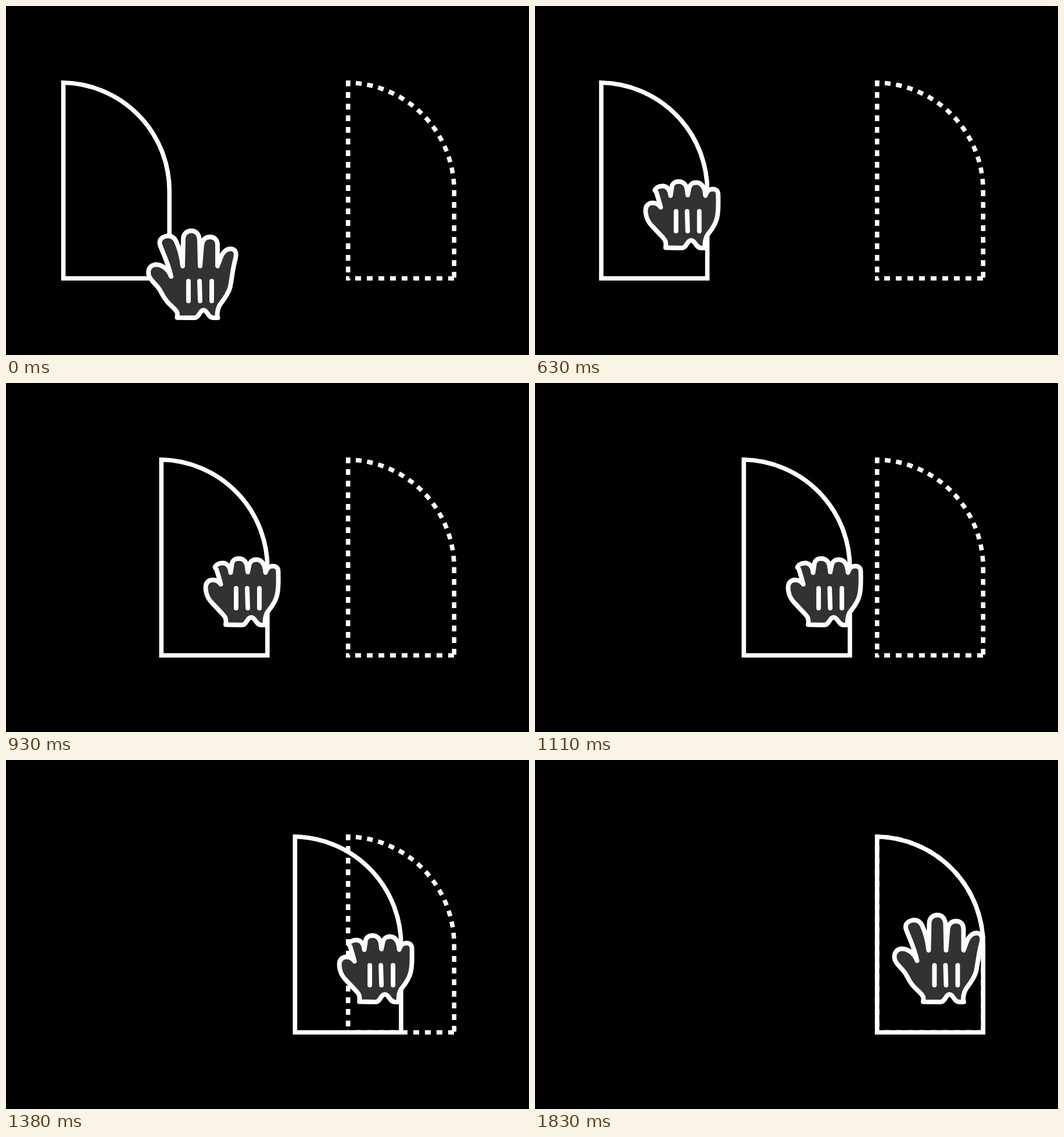
Write an HTML page that moves like this. It is 900 by 600 pixels and loops after 2580 ms.

```html
<!DOCTYPE html>
<html lang="en">
<head>
<meta charset="utf-8">
<title>Drag and drop</title>
<style>
  html, body { margin: 0; width: 100%; height: 100%; overflow: hidden; background: #000; }
  svg { display: block; width: 900px; height: 600px; }
  path { fill: none; stroke: #fff; stroke-width: 7.6; }
  #hand path { stroke-width: 7.9; stroke-linecap: round; stroke-linejoin: round; }
  #hand .glove { fill: #323232; }
  .dashed { stroke-dasharray: 10 10; }
  .dashed.arc { stroke-dasharray: 10 9.57; stroke-dashoffset: -13.3; }
</style>
</head>
<body>
<svg viewBox="0 0 900 600">
  <!-- drop zone: each edge carries its own dash rhythm -->
  <path class="dashed" d="M588.7 128V472"/>
  <path class="dashed" d="M770.9 468.2H585"/>
  <path class="dashed" d="M771.2 466.9V318"/>
  <path class="dashed arc" d="M588.7 131.8A186.2 186.2 0 0 1 771.2 318"/>

  <path id="shape" d="M98.7 131.8A186.2 186.2 0 0 1 281.2 318V468.2H98.7Z"/>

  <g id="hand">
    <path id="open" class="glove" d="M284 465C279 452 268 444 257 444.500C246 446 243 456 246.500 465
      C250 473 259 479 264 487C270 497 272 503 279 510C285 517 295 523 295 530L294.5 535.800L324 536
      C333 536 333 523 340 523C347 523 347 536 357 536L364.500 536C362 529 365 517 370 511
      C377 502 383 493 385.500 484C389 468 390 452 394 438C398 424 395 418 387 417.500
      C379 417 373 424 370 431L364 447V411C364 401 358 397 351 397C343 397 338 402 337 411
      L334 447L333 402C332 391 326 386.500 319 386.500C311 386.500 305 392 305 401L304 447
      C302 430 297 413 292 403C288 396 282 394.500 276 395.500C266 398 262.500 404 265.500 412
      C269 422 280 444 284 465Z"/>
    <path id="closed" class="glove" transform="translate(71.5 120)" d="M216 346C212 339 203 337 197 339.500
      C189 343 189 351 191 360C193 369 197 374 201 378L217 395C224 402 225 405 225 410L224.5 415.500
      L252 416C261 416 261 403 268.500 403C276 403 276 416 286 416L293 416C291 409 293 397 298.500 391
      C305 383 311 374 313 364C316 352 315 335 315 324C315 316 309 314 303 315C298 316 295 320 293 326
      C292 311 286 303.500 277 303.500C270 303.500 266 308 265 313L262.500 325L261 313
      C259 306 254 301.700 247 301.700C240 301.700 235 306 235 313L233 326
      C232 316 227 309.500 219 309.500C212 309.500 207 313 206 317L208.500 320C211 328 214 338 216 346Z"/>
    <path d="M314 473V507M333 473L334 507M354 473V507"/>
  </g>
</svg>
<script>
  const LOOP = 2580, STEP = 30;
  const GRAB = 450, DROP = 1830;
  const [shape, hand, open, closed] =
    ['shape', 'hand', 'open', 'closed'].map(id => document.getElementById(id));

  const progress = (t, start, duration) => Math.min(1, Math.max(0, (t - start) / duration));
  const move = (el, x, y) => el.setAttribute('transform', `translate(${x} ${y})`);
  const show = (el, visible) => el.setAttribute('visibility', visible ? 'visible' : 'hidden');

  function draw(now) {
    const t = Math.floor(now % LOOP / STEP) * STEP;
    const reach = progress(t, 0, 396);
    const drag = 460 * progress(t, 600, 900);
    const holding = t >= GRAB && t < DROP;

    move(hand, drag - 86.6 * reach, -120 * reach);
    move(shape, t < DROP ? drag : 490, 0); // snaps into place on release
    show(closed, holding);
    show(open, !holding);
  }

  let start;
  function tick(now) {
    start ??= now;
    draw(now - start);
    requestAnimationFrame(tick);
  }
  draw(0);
  requestAnimationFrame(tick);
</script>
</body>
</html>
```
